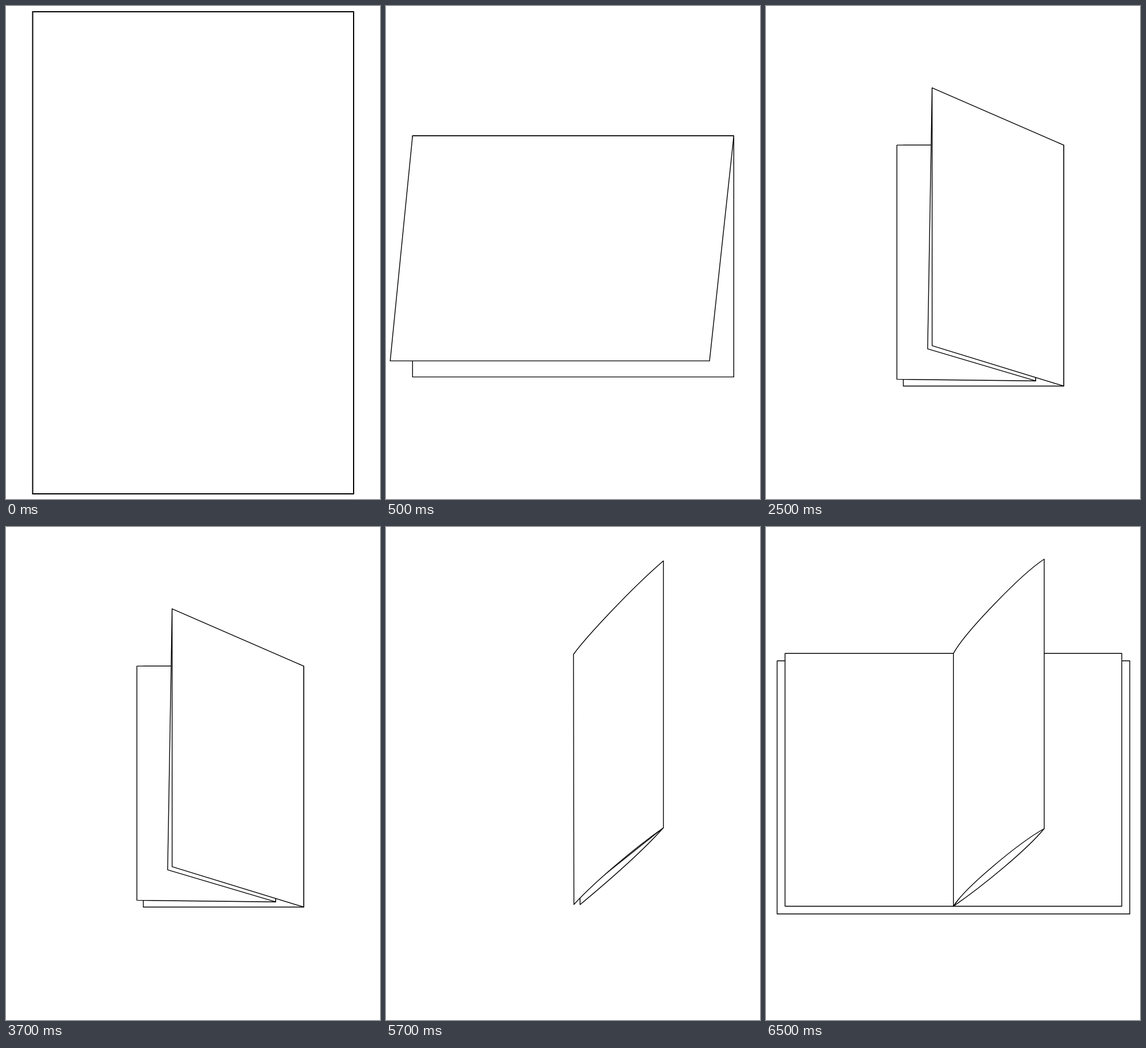
An HTML page that plays this animation: 652x859 px, repeating every 8 s.

```html
<!DOCTYPE html>
<html lang="en">
<head>
<meta charset="utf-8">
<title>Folding a sheet into a booklet</title>
<style>
  html, body { margin: 0; width: 100%; height: 100%; overflow: hidden; background: #fff; }
  svg { display: block; width: 100%; height: 100%; }
  path { fill: #fff; stroke: #000; stroke-width: 1.4; stroke-linejoin: round; }
  .sheet path { stroke-width: 2; stroke-linejoin: miter; }
</style>
</head>
<body>
<svg viewBox="0 0 652 859">
  <g class="step sheet">
    <path d="M46.5 10H606V850H46.5Z"/>
  </g>
  <g class="step">
    <path d="M46.3 226.3H606.3V646.4H46.3Z"/>
    <path d="M46.3 226.3H606.3L564 618.4H7.3Z"/>
  </g>
  <g class="step">
    <path d="M239.4 242.4H519V662.2H239.4Z"/>
    <path d="M228.2 242.4H470V653.2L228.2 650.4Z"/>
    <path d="M289.6 142.6L281.8 597.3L470 653.2V500Z"/>
    <path d="M289.6 142.6L519 242.4V662.2L289.6 591.8Z"/>
  </g>
  <g class="step">
    <path d="M338.3 640V658C390 615 450 562 483.6 524Z"/>
    <path d="M326.8 222C350 190 430 105 483.6 59V524C430 562 362 620 327.6 657.8Z"/>
  </g>
  <g class="step">
    <path d="M19.4 233.3H634.2V674.3H19.4Z"/>
    <path d="M33.2 220.3H620.3V660.8H33.2Z"/>
    <path d="M326.7 660.8C380 624 455 562 485 525.5L400 560Z"/>
    <path d="M326.7 220.3C347 183 445 82 485 56V525.5C440 551 347 628 326.7 660.8Z"/>
  </g>
</svg>
<script>
  const LOOP = 8000;
  const starts = [0, 500, 2500, 4500, 6500];
  const steps = document.querySelectorAll('.step');

  function draw(now) {
    const t = now % LOOP;
    const current = starts.findLastIndex(start => t >= start);
    steps.forEach((step, i) => {
      step.style.display = i === current ? '' : 'none';
    });
  }

  const begin = performance.now();
  function tick() {
    draw(performance.now() - begin);
    requestAnimationFrame(tick);
  }
  tick();
</script>
</body>
</html>
```
